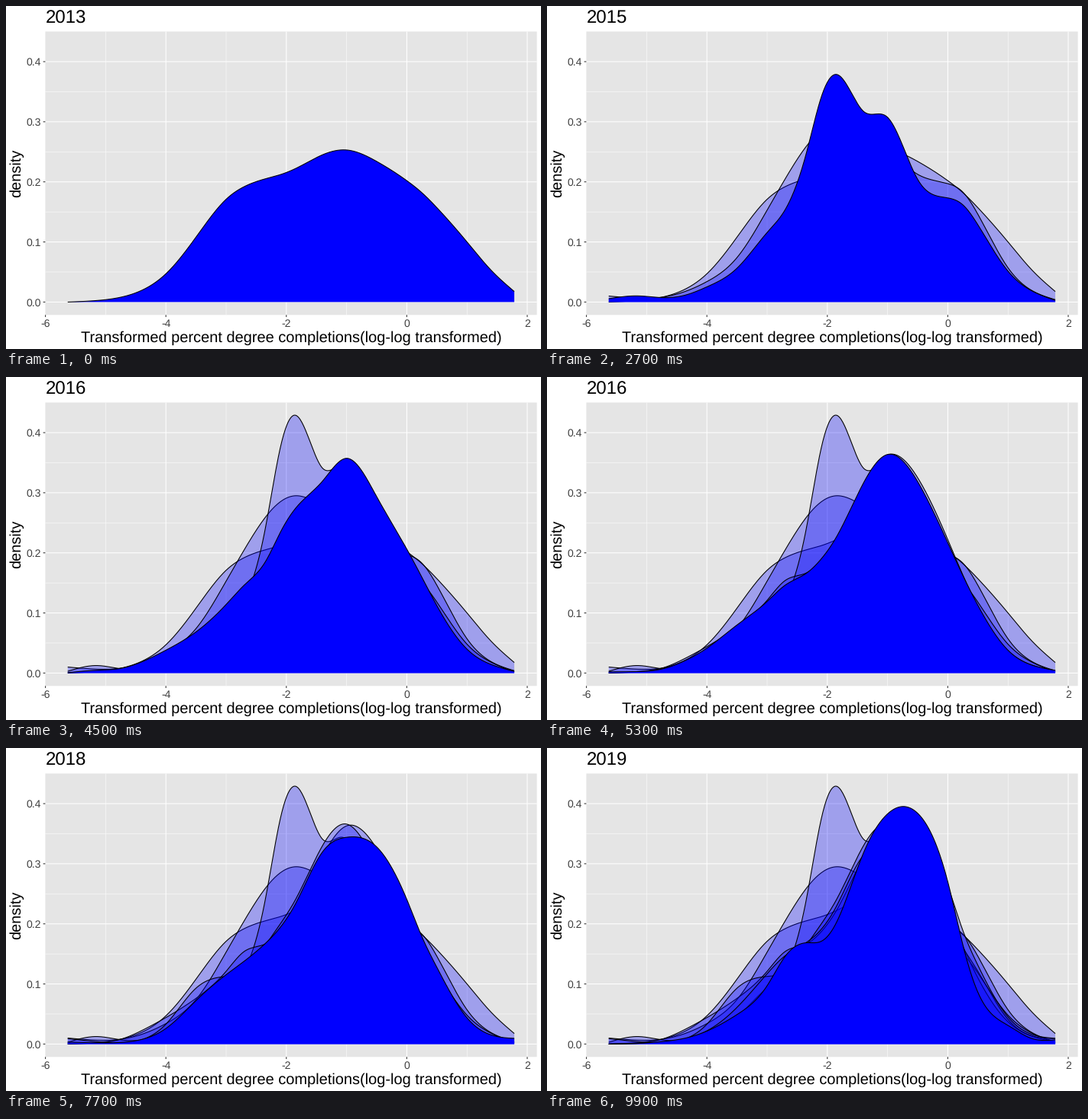
Write a matplotlib script that moves like this. It is 700 by 450 pixels and loops after 10000 ms.

```python
import matplotlib.pyplot as plt
import numpy as np
from matplotlib.animation import FuncAnimation
from matplotlib.patches import Rectangle

W, H, DPI = 700, 450, 100
FRAMES, INTERVAL = 100, 100
PT = 72 / DPI  # points per pixel
LEFT, RIGHT, TOP, BOTTOM = 51.4, 694.6, 33.5, 405.3

plt.rcParams.update({"font.family": "Liberation Sans", "text.hinting": "none"})

# Density of each year at shared knots, joined by a natural cubic spline.
KNOTS = np.array([-5.63, -5.15, -4.75, -4.35, -4, -3.5, -3, -2.7, -2.35, -2.1,
                  -1.85, -1.4, -1, -0.5, 0, 0.25, 0.5, 1, 1.4, 1.785])
DENSITY = {
    2013: [0, .0025, .008, .022, .047, .108, .171, .192, .205, .212,
           .222, .245, .253, .234, .202, .182, .157, .100, .053, .0175],
    2014: [.010, .0065, .008, .018, .034, .074, .153, .205, .259, .285,
           .295, .278, .253, .2125, .197, .183, .146, .057, .019, .004],
    2015: [.003, .0125, .007, .008, .020, .0457, .0933, .123, .240, .375,
           .429, .341, .340, .199, .159, .149, .118, .048, .018, .002],
    2016: [0, .002, .008, .025, .044, .076, .121, .154, .1665, .187,
           .222, .312, .363, .325, .222, .163, .110, .037, .013, .003],
    2017: [.009, .004, .002, .009, .033, .093, .1125, .121, .164, .200,
           .240, .330, .366, .297, .200, .160, .121, .041, .0135, .009],
    2018: [0, .001, .003, .009, .022, .061, .117, .147, .169, .191,
           .229, .314, .332, .345, .263, .189, .131, .045, .016, .0095],
    2019: [0, .001, .004, .010, .0215, .049, .097, .146, .1685, .171,
           .202, .318, .383, .384, .270, .165, .086, .031, .009, .007],
}
YEARS = list(DENSITY)
KEYS = [0, 17, 33, 49, 66, 83, 99]  # step at which each year is reached


def px(x):
    return 524.4 + 78.8 * x


def py(y):
    return 388.4 - 788.5 * y


def spline(xk, yk, x):
    n, h = len(xk), np.diff(xk)
    a, b = np.eye(n), np.zeros(n)
    for i in range(1, n - 1):
        a[i, i - 1:i + 2] = h[i - 1], 2 * (h[i - 1] + h[i]), h[i]
        b[i] = 6 * ((yk[i + 1] - yk[i]) / h[i] - (yk[i] - yk[i - 1]) / h[i - 1])
    m = np.linalg.solve(a, b)
    i = np.clip(np.searchsorted(xk, x, side="right") - 1, 0, n - 2)
    l, r, hi = xk[i + 1] - x, x - xk[i], h[i]
    return ((m[i] * l**3 + m[i + 1] * r**3) / (6 * hi)
            + (yk[i] / hi - m[i] * hi / 6) * l
            + (yk[i + 1] / hi - m[i + 1] * hi / 6) * r)


xs = np.linspace(KNOTS[0], KNOTS[-1], 512)
curves = [np.maximum(spline(KNOTS, np.array(DENSITY[y]), xs), 0) for y in YEARS]

fig = plt.figure(figsize=(W / DPI, H / DPI), dpi=DPI, facecolor="white")
ax = fig.add_axes([0, 0, 1, 1])
ax.set(xlim=(0, W), ylim=(H, 0))
ax.axis("off")


def rule(x, y, color, width, z):
    ax.plot(x, y, color=color, lw=width * PT, zorder=z, snap=False,
            solid_capstyle="butt")


def label(x, y, text, size, color="black", **kw):
    kw = {"va": "baseline", **kw}
    return ax.text(x, y, text, fontsize=size * PT, color=color, **kw)


def outline(ys):
    top = np.column_stack([px(xs), py(ys)])
    base = [[px(xs[-1]), py(0)], [px(xs[0]), py(0)]]
    return top, np.vstack([top, base])


def area(ys, alpha, z):
    top, poly = outline(ys)
    fill, = ax.fill(*poly.T, color="#0000ff", alpha=alpha, lw=0, zorder=z)
    line, = ax.plot(*top.T, color="black", lw=1.07 * PT, zorder=z + 0.5,
                    solid_capstyle="butt", solid_joinstyle="round")
    return fill, line


ax.add_patch(Rectangle((LEFT, TOP), RIGHT - LEFT, BOTTOM - TOP,
                       fc="#e5e5e5", lw=0, zorder=0, snap=False))
for x in (-5, -3, -1, 1):
    rule([px(x)] * 2, [TOP, BOTTOM], "white", 0.53, 1)
for y in (0.05, 0.15, 0.25, 0.35):
    rule([LEFT, RIGHT], [py(y)] * 2, "white", 0.53, 1)
for x in (-6, -4, -2, 0, 2):
    if x > -6:
        rule([px(x)] * 2, [TOP, BOTTOM], "white", 1.07, 2)
    rule([px(x)] * 2, [BOTTOM, BOTTOM + 2.75], "#333333", 1.07, 2)
    label(px(x), 420.7, str(x), 14, "#404040", ha="center")
for y in (0, 0.1, 0.2, 0.3, 0.4):
    rule([LEFT, RIGHT], [py(y)] * 2, "white", 1.07, 2)
    rule([LEFT - 2.75, LEFT], [py(y)] * 2, "#333333", 1.07, 2)
    label(46.4, py(y) + 5, f"{y:.1f}", 14, "#404040", ha="right")

title = label(LEFT, 23, "2013", 24)
label((LEFT + RIGHT) / 2, 441,
      "Transformed percent degree completions(log-log transformed)", 20,
      ha="center")
label(19.5, (TOP + BOTTOM) / 2, "density", 20, rotation=90, ha="right",
      va="center", rotation_mode="default").set(ha="center", x=13.7)

shadows = [area(c, 0.3, 3 + i) for i, c in enumerate(curves[:-1])]
fill, line = area(curves[0], 1, 20)


def update(k):
    ys = [np.interp(k, KEYS, col) for col in np.transpose(curves)]
    top, poly = outline(np.array(ys))
    fill.set_xy(poly)
    line.set_data(*top.T)
    for key, parts in zip(KEYS, shadows):
        for part in parts:
            part.set_visible(k > key)
    span = YEARS[-1] - YEARS[0]
    title.set_text(str(round(YEARS[0] + span * k / (FRAMES - 1))))
    return fill, line, title


anim = FuncAnimation(fig, update, frames=FRAMES, interval=INTERVAL,
                     repeat=True, repeat_delay=0)
plt.show()
```
